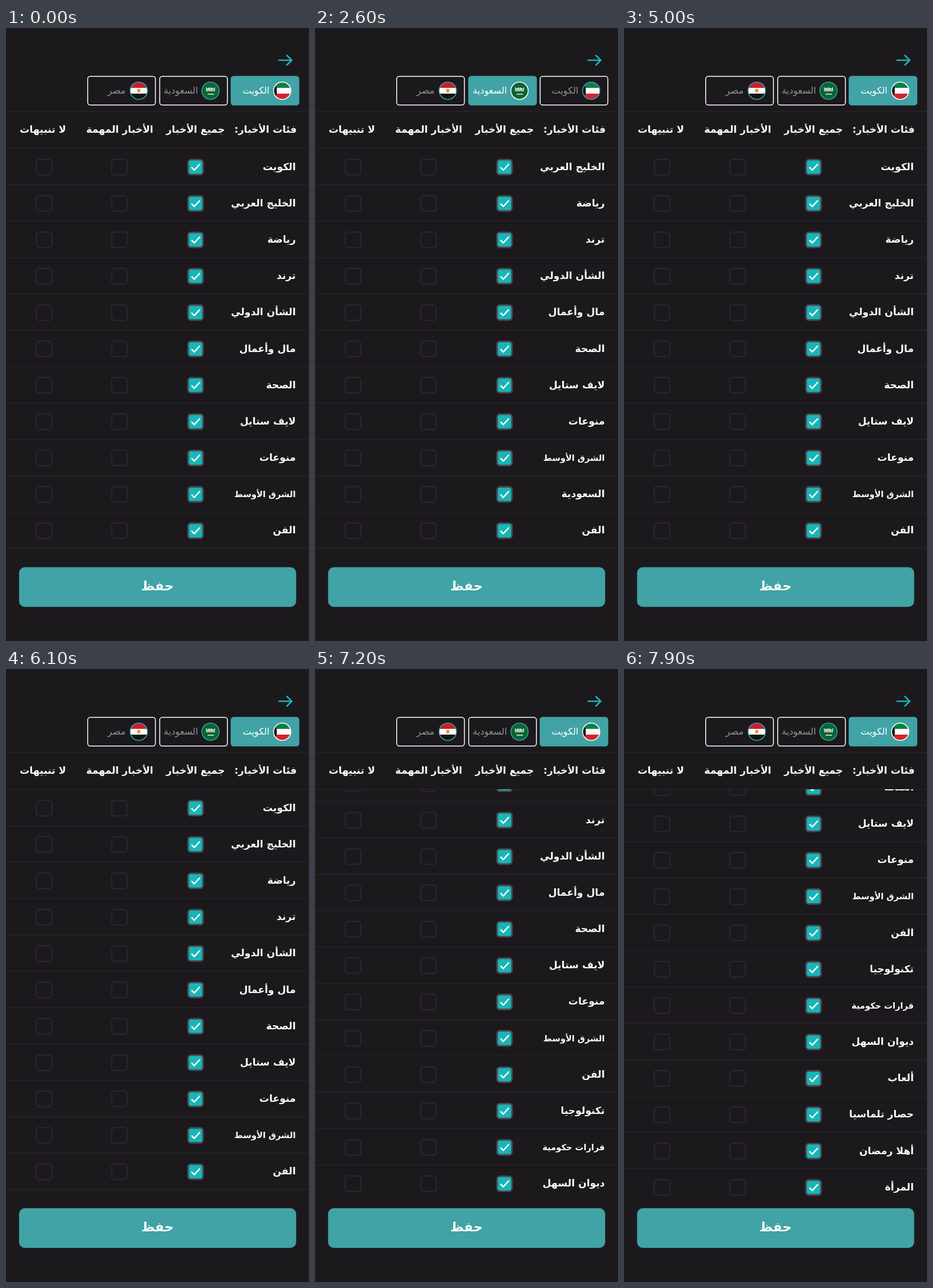
An HTML page that plays this animation: 526 px wide and 1065 px high, repeating every 8 s.

```html
<!DOCTYPE html>
<html lang="ar">
<head>
<meta charset="utf-8">
<style>
  html, body { margin: 0; width: 100%; height: 100%; overflow: hidden; background: #1c191d; }
  svg { display: block; width: 100vw; height: 100vh; }
  text { font: bold 17px "DejaVu Sans", sans-serif; fill: #fff; direction: rtl; }
  .mid { text-anchor: middle; }
  .small { font-size: 14.5px; }
  .line { stroke: #272429; stroke-width: 1.5; }
  .box { fill: none; stroke: #29262b; stroke-width: 2.5; }
  .tab rect { fill: none; stroke: #fff; stroke-width: 1.5; }
  .tab text { font-size: 16px; font-weight: normal; fill: #929093; }
  .tab .ring { fill: none; stroke: #2fa5a6; stroke-width: 1.5; }
  .tab.on rect { fill: #41a3a5; stroke: #41a3a5; }
  .tab.on text { fill: #fff; }
  .tab.on .ring { stroke: #fff; }
</style>
</head>
<body>
<svg viewBox="0 0 526 1065" preserveAspectRatio="none">
  <defs>
    <clipPath id="view"><rect y="209" width="526" height="708"/></clipPath>
    <clipPath id="disc"><circle r="15"/></clipPath>
    <g id="off"><rect class="box" x="-13.5" y="-13.5" width="27" height="27" rx="5"/></g>
    <g id="on">
      <rect x="-13" y="-13" width="26" height="26" rx="5" fill="#18b5b8" stroke="#4b474c" stroke-width="2.8"/>
      <path d="M-6.3 1L-2.2 5.3L7 -4.8" fill="none" stroke="#fff" stroke-width="2.5" stroke-linecap="round" stroke-linejoin="round"/>
    </g>
  </defs>
  <path d="M473 56H496M487 47L496 56L487 65" fill="none" stroke="#18b5b8" stroke-width="2.6"/>
  <g id="tabs"></g>
  <path class="line" d="M0 145H526M0 209H526"/>
  <g id="heads"></g>
  <g clip-path="url(#view)"><g id="lists"></g></g>
  <rect x="22.7" y="936.8" width="481" height="69" rx="10" fill="#41a3a5"/>
  <text class="mid" x="263" y="977" style="font-size:22.5px">حفظ</text>
</svg>
<script>
const LOOP = 8000, PITCH = 63.17;
const $ = id => document.getElementById(id);

const flags = [
  `<path d="M-15 -15H15V-5H-15Z" fill="#0b8043"/><path d="M-15 -5H15V5H-15Z" fill="#fff"/>
   <path d="M-15 5H15V15H-15Z" fill="#d3222d"/><path d="M-15 -15L-9.5 -5V5L-15 15Z" fill="#111"/>`,
  `<path d="M-15 -15H15V15H-15Z" fill="#0a6432"/>
   <path d="M-7 -6V0H-4V-5M-2 -6V0H1V-6M3 -5V0H7V-6M-7 -3H7M-5 6H6" fill="none" stroke="#e8f0e9" stroke-width="1.3"/>`,
  `<path d="M-15 -15H15V-5H-15Z" fill="#ce1b2b"/><path d="M-15 -5H15V5H-15Z" fill="#fff"/>
   <path d="M-15 5H15V15H-15Z" fill="#111"/><path d="M-3 -3H3L2 3H-2Z" fill="#d39a35"/>`
];

const tabs = [["الكويت", 390.8, 434, 479.5], ["السعودية", 266.8, 303.5, 355], ["مصر", 141.8, 192, 230.5]];
$("tabs").innerHTML = tabs.map(([name, x, textX, flagX], i) => `<g class="tab">
  <rect x="${x}" y="84" width="117.6" height="49.7" rx="4.5"/>
  <text class="mid" x="${textX}" y="114">${name}</text>
  <g transform="translate(${flagX} 109)"><g clip-path="url(#disc)">${flags[i]}</g><circle class="ring" r="15"/></g></g>`).join("");

const heads = [["فئات الأخبار:", 450.5], ["جميع الأخبار", 329], ["الأخبار المهمة", 197.5], ["لا تنبيهات", 64]];
$("heads").innerHTML = heads.map(([s, x]) => `<text class="mid" x="${x}" y="182">${s}</text>`).join("");

const common = ["الخليج العربي", "رياضة", "ترند", "الشأن الدولي", "مال وأعمال", "الصحة",
  "لايف ستايل", "منوعات", "الشرق الأوسط"];
const lists = [
  ["الكويت", ...common, "الفن", "تكنولوجيا", "قرارات حكومية", "ديوان السهل", "ألعاب",
    "حصار تلماسيا", "أهلا رمضان", "المرأة"],
  [...common, "السعودية", "الفن"]
];
const longNames = ["الشرق الأوسط", "قرارات حكومية"];

const row = (name, i) => `<g transform="translate(0 ${241.7 + i * PITCH})">
  <text x="503" y="5" class="${longNames.includes(name) ? "small" : ""}">${name}</text>
  <use href="#on" x="329"/><use href="#off" x="197"/><use href="#off" x="66"/>
  <path class="line" d="M0 30.7H526"/></g>`;
$("lists").innerHTML = lists.map(l => `<g>${l.map(row).join("")}</g>`).join("");

// Finger drag speeds up, then the list coasts with friction.
function scrollAt(t) {
  if (t < 6726) return 0;
  if (t < 7050) return 857 * ((t - 6726) / 1000) ** 2;
  return 90 + 574.5 * (1 - Math.exp(-(t - 7050) / 1020));
}

const start = performance.now();
function draw() {
  // The picture advances ten times a second.
  const t = Math.floor((performance.now() - start) % LOOP / 100) * 100;
  const active = t >= 1500 && t < 4100 ? 1 : 0;
  [...$("tabs").children].forEach((tab, i) => tab.classList.toggle("on", i === active));
  [...$("lists").children].forEach((list, i) => list.style.display = i === active ? "" : "none");
  $("lists").setAttribute("transform", `translate(0 ${-scrollAt(t)})`);
  requestAnimationFrame(draw);
}
draw();
</script>
</body>
</html>
```
